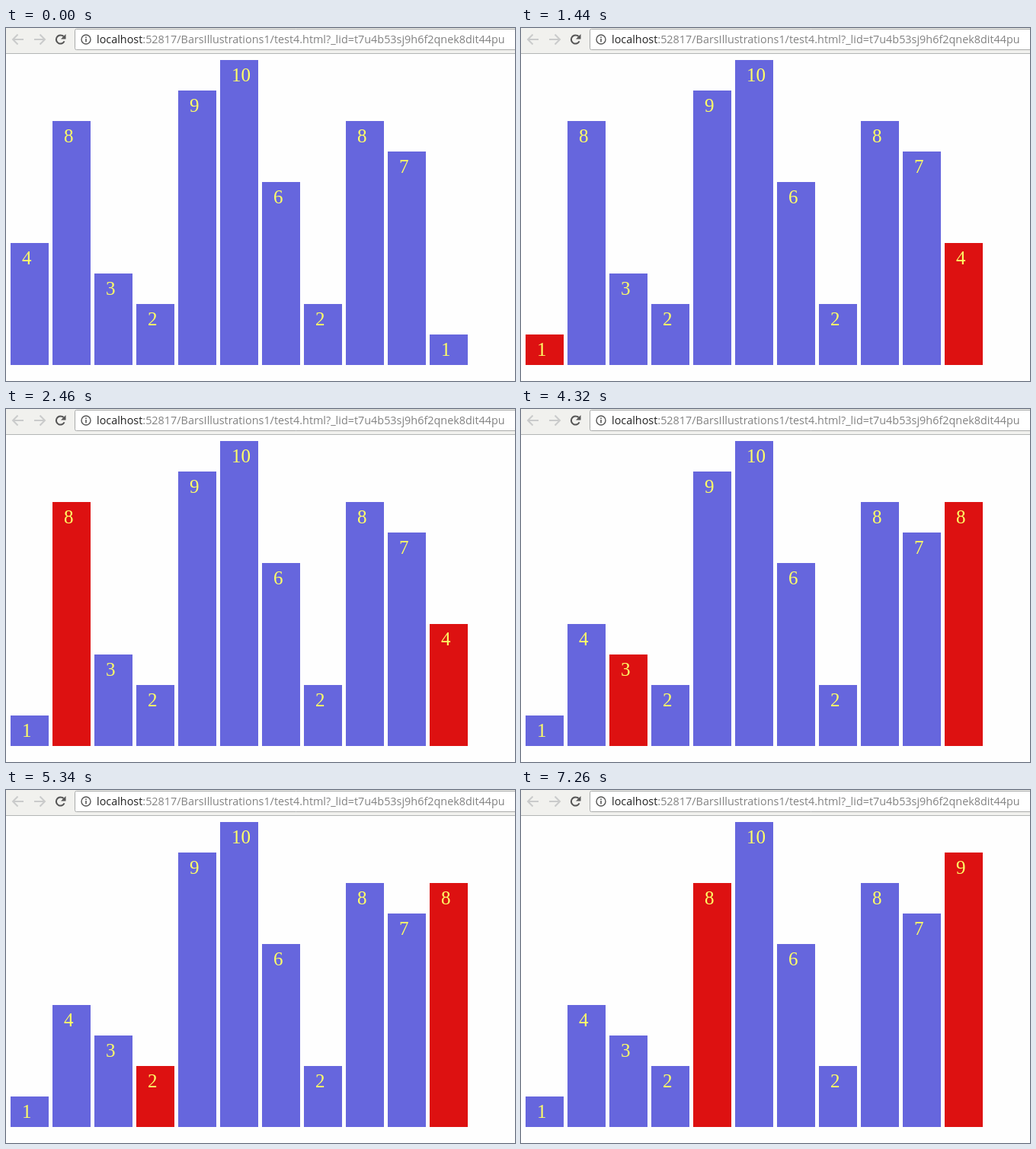
An HTML page with a canvas that plays this animation: 668x463 px, repeating every 8 s.

```html
<!DOCTYPE html>
<html lang="en">
<head>
<meta charset="utf-8">
<title>Bars</title>
<style>
html, body { margin: 0; width: 100%; height: 100%; overflow: hidden; background: #fefefe; }
canvas { display: block; }
</style>
</head>
<body>
<canvas id="stage" width="668" height="463"></canvas>
<script>
const ctx = document.getElementById('stage').getContext('2d');
const LOOP = 8000;
const START = [4, 8, 3, 2, 9, 10, 6, 2, 8, 7, 1];
const LAST = START.length - 1;

// [time, index compared with the last bar, swap the two]
const STEPS = [
  [480, 0, false],
  [1440, 0, true],
  [2460, 1, false],
  [3360, 1, true],
  [4320, 2, false],
  [5340, 3, false],
  [6300, 4, false],
  [7260, 4, true]
];

function stateAt(t) {
  const values = START.slice();
  let active = -1;
  for (const [at, i, swap] of STEPS) {
    if (t < at) break;
    active = i;
    if (swap) [values[i], values[LAST]] = [values[LAST], values[i]];
  }
  return { values, active };
}

function rect(x, y, w, h, color) {
  ctx.fillStyle = color;
  ctx.fillRect(x, y, w, h);
}

function text(str, x, y, font, color) {
  ctx.font = font;
  ctx.fillStyle = color;
  ctx.fillText(str, x, y);
  return x + ctx.measureText(str).width;
}

function stroke(color, width, build) {
  ctx.strokeStyle = color;
  ctx.lineWidth = width;
  ctx.beginPath();
  build();
  ctx.stroke();
}

function arrow(x, dir) {
  const tip = x + 7 * dir;
  stroke('#cacbcb', 2, () => {
    ctx.moveTo(x - 7 * dir, 15);
    ctx.lineTo(tip - dir, 15);
    ctx.moveTo(tip - 6.5 * dir, 8.5);
    ctx.lineTo(tip, 15);
    ctx.lineTo(tip - 6.5 * dir, 21.5);
  });
}

function reloadIcon() {
  stroke('#555', 2, () => ctx.arc(71.5, 15, 5.6, 0.45, Math.PI * 1.75));
  ctx.fillStyle = '#555';
  ctx.beginPath();
  ctx.moveTo(78.5, 8);
  ctx.lineTo(78.5, 14.5);
  ctx.lineTo(72, 14.5);
  ctx.fill();
}

function infoIcon() {
  stroke('#555', 1.4, () => ctx.arc(105, 15, 6, 0, Math.PI * 2));
  rect(104.2, 11.4, 1.6, 1.6, '#555');
  rect(104.2, 14, 1.6, 4.4, '#555');
}

function drawToolbar() {
  rect(0, 0, 668, 33, '#f1f1ee');
  rect(0, 33, 668, 1, '#b3b6b5');
  ctx.fillStyle = '#fff';
  stroke('#a9abaa', 1, () => {
    ctx.roundRect(90.5, 1.5, 600, 27, 2);
    ctx.fill();
  });
  arrow(16, -1);
  arrow(44, 1);
  reloadIcon();
  infoIcon();
  const font = '14.4px "Open Sans", "Noto Sans", sans-serif';
  const x = text('localhost', 119, 20, font, '#222');
  text(':52817/BarsIllustrations1/test4.html?_lid=t7u4b53sj9h6f2qnek8dit44pu', x, 20, font, '#828282');
}

function drawBars({ values, active }) {
  values.forEach((v, i) => {
    const red = active >= 0 && (i === active || i === LAST);
    const x = 6 + 55 * i;
    const y = 442 - 40 * v;
    rect(x, y, 50, 40 * v, red ? '#dd1111' : '#6666dd');
    text(String(v), x + 15, y + 28, '25px "Liberation Serif", serif', '#ffff66');
  });
}

function frame() {
  rect(0, 0, 668, 463, '#fefefe');
  drawToolbar();
  drawBars(stateAt(performance.now() % LOOP));
  requestAnimationFrame(frame);
}
frame();
</script>
</body>
</html>
```
